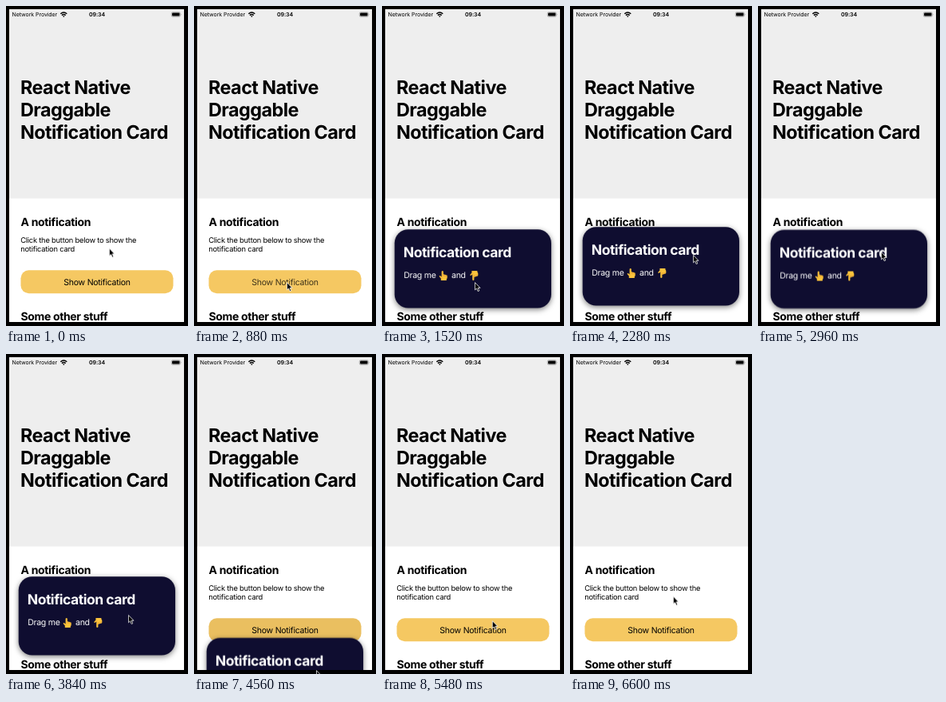
An HTML page for the animation above (8010 ms loop, 228x400 px).

```html
<!DOCTYPE html>
<html lang="en">
<head>
<meta charset="utf-8">
<title>Draggable notification card</title>
<style>
  html, body { margin: 0; width: 100%; height: 100%; overflow: hidden; background: #000; }
  svg { display: block; width: 100vw; height: 100vh; }
  text {
    font-family: Inter, "Liberation Sans", sans-serif;
    font-optical-sizing: none;
    text-rendering: geometricPrecision;
    letter-spacing: -.024em;
  }
  .title { font-size: 23.4px; font-weight: 700; letter-spacing: -.03em; }
  .heading { font-size: 14px; font-weight: 700; }
  .body { font-size: 9.35px; }
  .label { font-size: 10.5px; }
  .status { font-size: 7px; letter-spacing: -.01em; }
  .time { font-weight: 600; text-anchor: middle; }
  .card-title { font-size: 17.5px; font-weight: 700; letter-spacing: -.027em; }
  .shadow { filter: drop-shadow(0 2px 3.8px rgba(0, 0, 0, .5)); }

  .button, .caption, .card, .pointer { animation: 8010ms linear infinite; }
  .button { animation-name: dim; }
  .caption { animation-name: press; }
  .card { animation-name: card; }
  .pointer { animation-name: pointer; }

  @keyframes dim {
    0%, 55.9% { fill: #f5c862; animation-timing-function: step-end; }
    55.92% { fill: #eabf60; animation-timing-function: step-end; }
    57.92%, 100% { fill: #f5c862; }
  }
  @keyframes press {
    0%, 10% { opacity: 1; }
    10.9%, 13.9% { opacity: .75; }
    14.9%, 100% { opacity: 1; }
  }
  @keyframes card {
    0% { transform: translateY(130px); }
    13.48% { transform: translateY(130px); animation-timing-function: cubic-bezier(.16, 1, .3, 1); }
    19.98%, 24.47% { transform: translateY(0); animation-timing-function: ease-out; }
    28.46% { transform: translateY(-3px); }
    29.96% { transform: translateY(-3.6px); }
    31.21% { transform: translateY(-3px); animation-timing-function: ease-out; }
    34.46%, 34.96% { transform: translateY(0); }
    36.95% { transform: translateY(.5px); animation-timing-function: ease-in-out; }
    40.45% { transform: translateY(36px); animation-timing-function: ease-in-out; }
    42.45% { transform: translateY(-1.6px); animation-timing-function: ease-in-out; }
    44.94%, 45.44% { transform: translateY(0); }
    47.94% { transform: translateY(-1px); animation-timing-function: ease-out; }
    50.44% { transform: translateY(-3.6px); animation-timing-function: ease-in; }
    52.93% { transform: translateY(0); animation-timing-function: ease-in; }
    55.43% { transform: translateY(32px); }
    56.93% { transform: translateY(75px); }
    57.93%, 100% { transform: translateY(130px); }
  }
  @keyframes pointer {
    0%, 2.3% { transform: translate(129px, 302.5px); animation-timing-function: ease-in-out; }
    10.49%, 24.2% { transform: translate(116px, 345px); animation-timing-function: ease-in-out; }
    28.46% { transform: translate(154px, 311px); animation-timing-function: ease-out; }
    29.96% { transform: translate(154px, 304px); }
    34.46%, 34.96% { transform: translate(154px, 306px); }
    36.95% { transform: translate(154px, 307px); animation-timing-function: ease-in-out; }
    40.45% { transform: translate(153px, 343px); animation-timing-function: ease-in-out; }
    44.94%, 45.44% { transform: translate(153px, 339px); }
    47.94% { transform: translate(153px, 326px); animation-timing-function: ease-out; }
    50.44% { transform: translate(153px, 300px); animation-timing-function: ease-in; }
    52.93% { transform: translate(153px, 338px); }
    55.43% { transform: translate(153px, 368px); }
    56.93% { transform: translate(153px, 395px); animation-timing-function: ease-out; }
    57.93%, 61.6% { transform: translate(153px, 397px); animation-timing-function: ease-in-out; }
    71.91% { transform: translate(133px, 313px); animation-timing-function: ease-out; }
    75.91% { transform: translate(129px, 303.5px); animation-timing-function: step-end; }
    82.39%, 100% { transform: translate(129px, 302.5px); }
  }
</style>
</head>
<body>
<svg viewBox="0 0 228 400" preserveAspectRatio="none">
  <defs>
    <clipPath id="screen"><rect x="4" y="4" width="219" height="391"/></clipPath>
    <g id="hand">
      <path d="M2.6 12V9.6L.6 7.2Q.2 6 1.4 6L3.4 7.4V1.2Q3.5 0 4.5 0T5.6 1.2V4.6Q6.8 4 7.4 4.9 8.6 4.5 9 5.4 10.4 5.2 10.5 6.4V8.6Q10.4 9.6 9.6 10.4V12Z" fill="#fcc43c"/>
      <path d="M5.6 4.8V7M7.4 5.1V7.2M9 5.6V7.4M3.4 7.4L4.4 8.6" fill="none" stroke="#d9882a" stroke-width=".5"/>
    </g>
  </defs>

  <rect width="228" height="400"/>
  <g clip-path="url(#screen)">
    <rect x="4" y="4" width="219" height="391" fill="#fff"/>
    <rect x="4" y="4" width="219" height="236.5" fill="#eee"/>

    <text class="status" x="7.5" y="13.3">Network Provider</text>
    <g fill="none" stroke="#000" stroke-width="1.4">
      <path d="M68.3 9.8Q72.3 6.2 76.3 9.8M69.9 11.6Q72.3 9.5 74.7 11.6"/>
    </g>
    <path d="M71 12.8Q72.3 11.8 73.6 12.8L72.3 14.1Z"/>
    <text class="status time" x="114" y="13.3">09:34</text>
    <rect x="207.3" y="7.8" width="11" height="5.6" rx="1.5" fill="none" stroke="#888" stroke-width=".6"/>
    <rect x="208.1" y="8.6" width="9.4" height="4" rx=".8"/>
    <path d="M219 9.7Q220 10.6 219 11.5Z" fill="#888"/>

    <g class="title">
      <text x="18" y="109.5">React Native</text>
      <text x="18" y="137.5">Draggable</text>
      <text x="18" y="165.5">Notification Card</text>
    </g>

    <text class="heading" x="18.6" y="275">A notification</text>
    <text class="body" x="18.2" y="296.4">Click the button below to show the</text>
    <text class="body" x="18.2" y="307.4">notification card</text>
    <rect class="button" x="18.5" y="330.3" width="191" height="29" rx="10" fill="#f5c862"/>
    <text class="label caption" x="114" y="348.7" text-anchor="middle">Show Notification</text>
    <text class="heading" x="18.4" y="393.2">Some other stuff</text>

    <g class="card" fill="#fff">
      <rect class="shadow" x="15.7" y="279.3" width="196.3" height="98.2" rx="17" fill="#0f0d30"/>
      <text class="card-title" x="26.8" y="314.4">Notification card</text>
      <text class="label" x="27.2" y="340.3">Drag me</text>
      <use href="#hand" x="71.2" y="331"/>
      <text class="label" x="87" y="340.3">and</text>
      <use href="#hand" transform="translate(109.8 343) scale(1 -1)"/>
    </g>
  </g>

  <path class="pointer" d="M.4 .6V9.9L2.5 8 4.2 11.6 5.8 10.9 4.2 7.4H7Z" stroke="#fff" stroke-width=".8" stroke-linejoin="round"/>
</svg>
</body>
</html>
```
